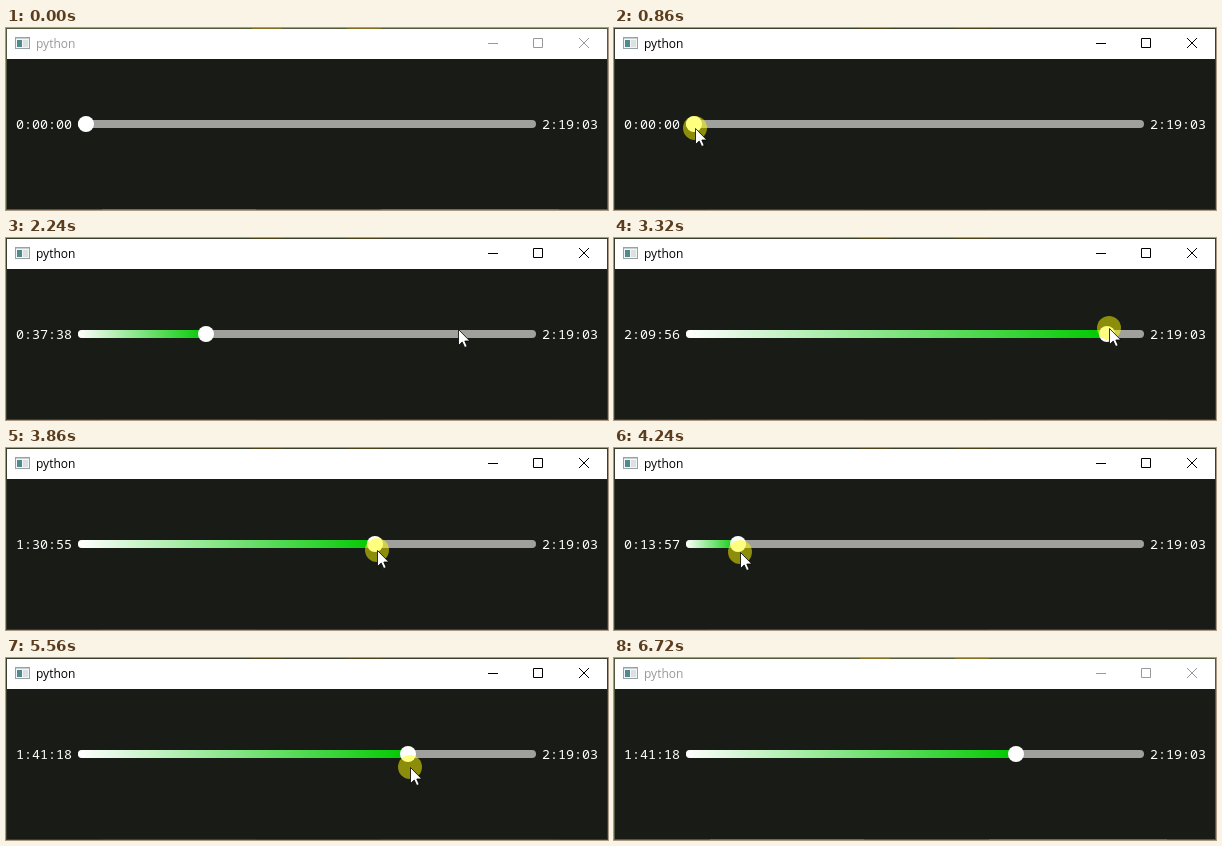
Animation, 602 px wide and 182 px high, one loop 6.82 s. Source, as an HTML page:

```html
<!DOCTYPE html>
<html>
<head>
<meta charset="utf-8">
<style>
  html, body { margin: 0; width: 100%; height: 100%; overflow: hidden; background: #191b16; }
  svg { display: block; }
  .title { font: 12px "Open Sans", "Noto Sans", sans-serif; }
  .time { font: 13.33px "Noto Sans Mono", "DejaVu Sans Mono", monospace; fill: #fff; }
</style>
</head>
<body>
<svg width="602" height="182" viewBox="0 0 602 182">
  <defs>
    <linearGradient id="fade">
      <stop offset="0" stop-color="#fff"/>
      <stop offset="1" stop-color="#00c800"/>
    </linearGradient>
  </defs>

  <rect width="602" height="182" fill="#191b16"/>
  <rect x="1" y="1" width="600" height="30" fill="#fff"/>
  <rect id="edge" x=".5" y=".5" width="601" height="181" fill="none"/>
  <path id="glints" d="M246 .5h30M341 .5h34M96 181.5h154M375 181.5h178"/>

  <g id="icon">
    <rect x="9.5" y="9.5" width="14" height="11" fill="#f4f6f6" stroke="#98a2a5"/>
    <path d="M10 10.5h13" stroke="#c6ced0"/>
    <rect x="11" y="12" width="5" height="7" fill="#4f8a8e"/>
    <rect x="17" y="12" width="5" height="7" fill="#dbe1e2"/>
  </g>
  <g id="bar">
    <text class="title" x="30" y="20">python</text>
    <path d="M482 15.5h10M527.5 10.5h9v9h-9zM573 10l10 10M583 10l-10 10" fill="none" stroke="currentColor"/>
  </g>

  <text id="now" class="time" x="10" y="101"></text>
  <text class="time" x="536" y="101">2:19:03</text>
  <rect x="72" y="92" width="458" height="8" rx="4" fill="#a0a19c"/>
  <rect id="fill" x="72" y="92" height="8" rx="4" fill="url(#fade)"/>
  <circle id="knob" cy="96" r="8" fill="#fff"/>

  <g id="mouse">
    <circle id="halo" r="12" fill="#ff0" fill-opacity=".5"/>
    <path d="M.5 .5V16.5L4.2 13L6.7 18.5L9.2 17.5L6.8 12H11.8Z" fill="#fff" stroke="#000" stroke-width=".8"/>
  </g>
</svg>
<script>
const LOOP = 6820, START = 80, TICK = 77.1;
const MIN = 80, MAX = 522, TOTAL = 8343;
const $ = id => document.getElementById(id);

// Where the hand pauses or turns: [tick, x, y]
const stops = [
  [-1, 230, 185], [5, 80, 100], [10, 81, 100],
  [15, 147, 94], [17, 180, 90], [18, 180, 90],
  [22, 201.63, 96], [28, 452, 91], [36, 502, 90],
  [40, 495, 90], [42, 495, 90], [45, 541, 100],
  [54.5, 96.6, 104], [63, 96.6, 104], [64, 121, 104],
  [71, 404, 109], [78, 404, 109], [82, 520, 185]
];
// First and last tick of each press
const presses = [[10, 15], [21, 22], [31, 32], [42, 76]];

const ease = u => u * u * (3 - 2 * u);
const isDown = tick => presses.some(([a, b]) => tick >= a && tick <= b);

function pointer(tick) {
  const i = stops.findLastIndex(s => s[0] <= tick);
  const [t0, x0, y0] = stops[i];
  const [t1, x1, y1] = stops[i + 1] || [t0 + 99, x0, y0];
  const u = ease((tick - t0) / (t1 - t0));
  return { x: x0 + (x1 - x0) * u, y: y0 + (y1 - y0) * u };
}

// The knob keeps the last place it was dragged to.
function knobAt(tick) {
  while (tick >= 0 && !isDown(tick)) tick--;
  return tick < 0 ? MIN : Math.min(MAX, Math.max(MIN, pointer(tick).x - 2));
}

function clock(s) {
  const pad = n => String(n).padStart(2, "0");
  return `${Math.floor(s / 3600)}:${pad(Math.floor(s / 60) % 60)}:${pad(s % 60)}`;
}

function draw() {
  const t = performance.now() % LOOP;
  const tick = Math.max(-1, Math.floor((t - START) / TICK));
  const p = pointer(tick), value = knobAt(tick), x = Math.round(value);
  const active = tick >= 10 && tick < 86;

  $("knob").setAttribute("cx", x);
  $("fill").setAttribute("width", x - 72);
  $("now").textContent = clock(Math.round((value - MIN) / (MAX - MIN) * TOTAL));
  $("mouse").setAttribute("transform", `translate(${Math.round(p.x)} ${Math.round(p.y)})`);
  $("halo").setAttribute("visibility", isDown(tick) ? "visible" : "hidden");
  $("bar").setAttribute("fill", active ? "#000" : "#999");
  $("bar").setAttribute("color", active ? "#000" : "#999");
  $("edge").setAttribute("stroke", active ? "#3a3f2c" : "#525c3c");
  $("glints").setAttribute("stroke", active ? "#4c431a" : "#80701f");
  requestAnimationFrame(draw);
}
draw();
</script>
</body>
</html>
```
